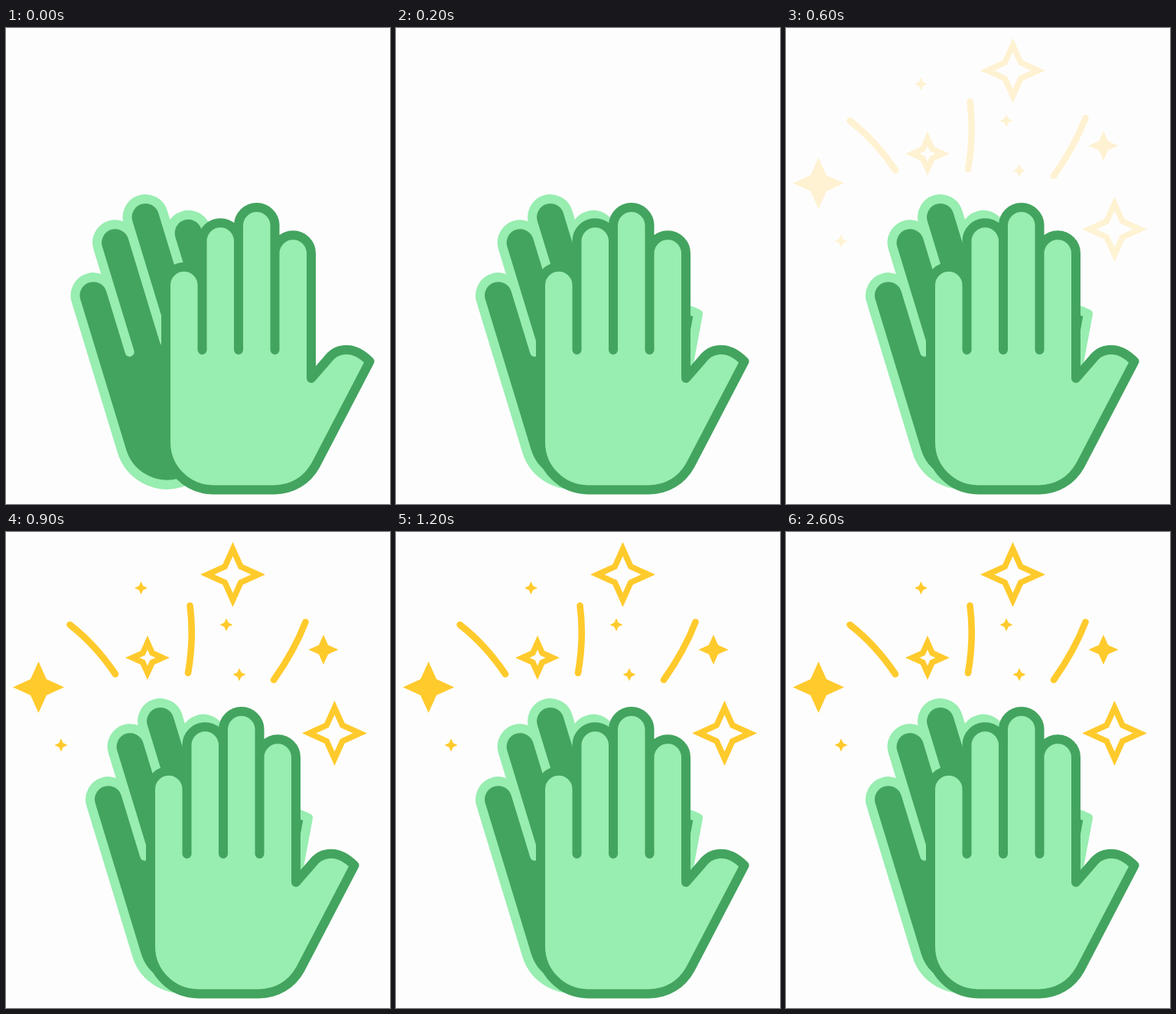
Animation, 502 px wide and 621 px high, one loop 3600 ms. Source, as an HTML page:

```html
<!DOCTYPE html>
<html lang="en">
<head>
<meta charset="utf-8">
<title>Clapping hands</title>
<style>
  html, body { margin: 0; width: 100%; height: 100%; overflow: hidden; background: #fefdfe; }
  svg { display: block; width: 100%; height: 100%; }
  .hand { stroke-width: 12; stroke-linejoin: round; }
  .front { fill: #98edb0; stroke: #43a45f; }
  .back { fill: #43a45f; stroke: #98edb0; }
  #rays { fill: none; stroke: #ffca2c; stroke-width: 8.6; stroke-linecap: round; }
  #stars { fill: #ffca2c; fill-rule: evenodd; }
</style>
</head>
<body>
<svg viewBox="0 0 502 621">
  <defs><path id="hand"/></defs>
  <g id="burst">
    <path id="rays" d="M83.5 121Q117 147 143 185.5M240.5 96Q246 138 238 184M391.5 117.5Q377 155 350 193"/>
    <path id="stars"/>
  </g>
  <g id="back"><use href="#hand" class="hand back" transform="translate(114 349) rotate(-17) translate(-232.5 -335.5)"/></g>
  <g id="front"><use href="#hand" class="hand front"/></g>
</svg>
<script>
const LOOP = 3600, STEP = 100;
const $ = id => document.getElementById(id);

// Four fingers side by side, given by the height of each knuckle arc.
const left = 209, width = 47.5;
const fingers = [335.5, 278, 257.7, 294].map((y, i) => {
  const end = left + (i + 1) * width;
  return `V${y}A${width / 2} ${width / 2} 0 0 1 ${end} ${y}V${i < 3 ? 420 : 457}`;
}).join("");

$("hand").setAttribute("d", `M${left} 540${fingers}` +
  "L420 433C431 418 453 412 475.5 435L404.7 570.5C393.5 590.5 374 602.4 351 602.4H271" +
  `A62 62 0 0 1 ${left} 540Z`);

function star(x, y, r) {
  const points = [];
  for (let i = 0; i < 8; i++) {
    const a = i * Math.PI / 4, d = i % 2 ? r * .44 : r;
    points.push([x + d * Math.sin(a), y - d * Math.cos(a)]);
  }
  return "M" + points.join("L") + "Z";
}

const hollow = [[296.5, 55.5, 42.5], [429.5, 262.5, 42.5], [185, 164, 29]];
const solid = [[42.5, 202.5, 33.5], [415, 153.5, 19.5]];
const sparks = [[176.5, 73], [288, 121], [305, 186], [72, 278]];

$("stars").setAttribute("d", [
  ...hollow.map(([x, y, r]) => star(x, y, r) + star(x, y, r - 18.5)),
  ...solid.map(s => star(...s)),
  ...sparks.map(([x, y]) => star(x, y, 8.5))
].join(""));

const easeOut = p => 1 - (1 - Math.min(Math.max(p, 0), 1)) ** 1.4;

function draw(now) {
  const t = Math.floor(now % LOOP / STEP) * STEP;
  const shift = 20 * easeOut(t / 200);
  $("front").setAttribute("transform", `translate(${-shift})`);
  $("back").setAttribute("transform", `translate(${shift * .975})`);
  $("burst").setAttribute("opacity", easeOut((t - 555) / 300));
}

const start = performance.now();
function tick() {
  draw(performance.now() - start);
  requestAnimationFrame(tick);
}
tick();
</script>
</body>
</html>
```
